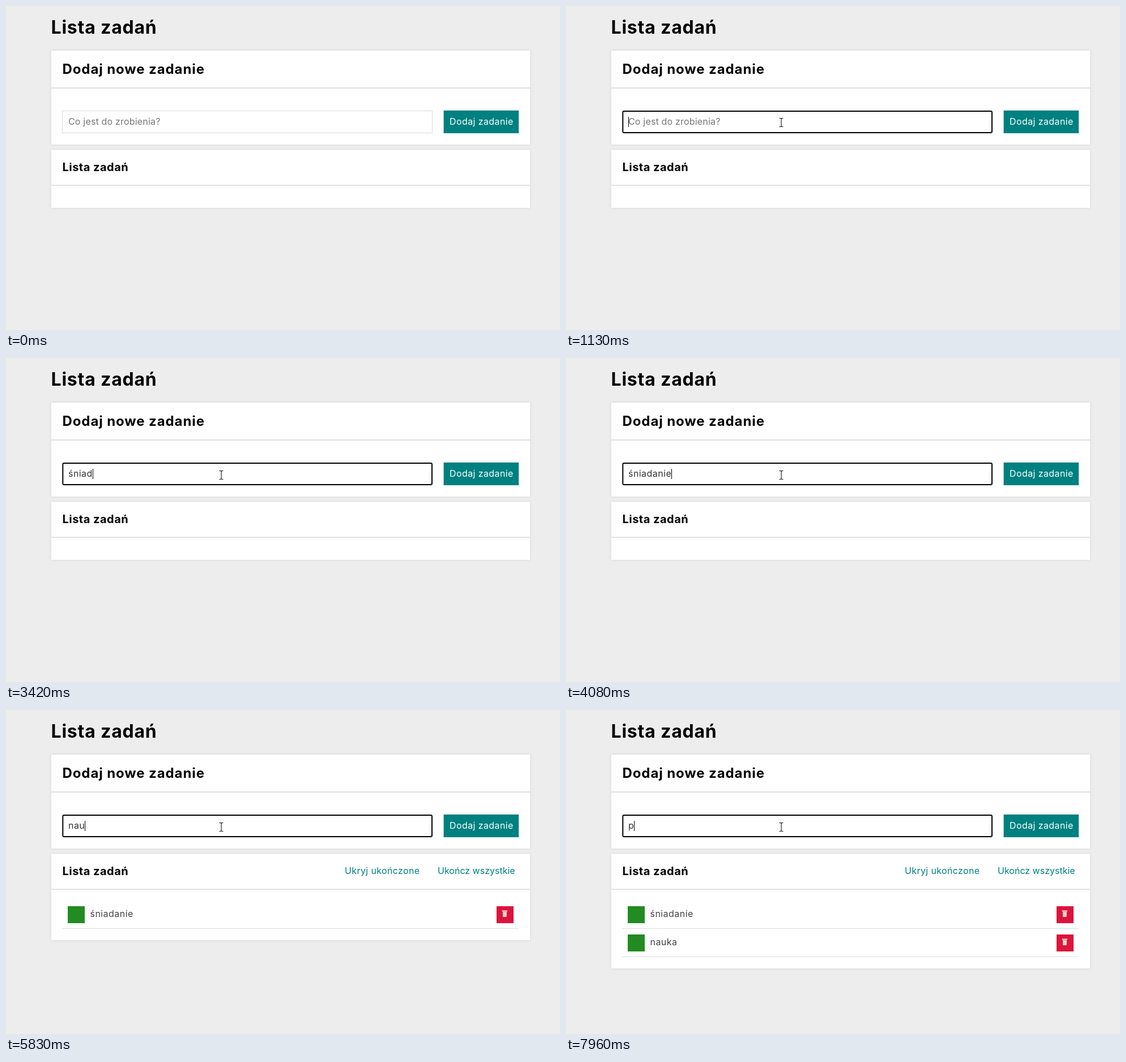
Recreate the animation shown at these times as an HTML page. Size 978x573 px, loop 8 s.

```html
<!DOCTYPE html>
<html lang="pl">
<head>
<meta charset="utf-8">
<title>Lista zadań</title>
<style>
html, body { margin: 0; width: 100%; height: 100%; overflow: hidden; background: #ededed; }
svg { display: block; width: 978px; height: 573px; font: 16px Inter, "Open Sans", sans-serif; letter-spacing: .35px; }
text { white-space: pre; }
.card { fill: #fff; filter: drop-shadow(0 0 2px #d4d4d4); }
.line { fill: #e3e3e3; }
.head { font-weight: 650; }
.link { fill: #008080; }
.item { fill: #444; letter-spacing: .45px; }
</style>
</head>
<body>
<svg viewBox="0 0 978 573">
  <defs>
    <g id="row">
      <rect x="109" y="347" width="30" height="30" fill="#228b22"/>
      <rect x="866" y="347" width="30" height="30" fill="#dc143c"/>
      <path d="M876 354.5h9v2h-9z" fill="#f6e9d8"/>
      <path d="M877 357h7l-.6 9h-5.8z" fill="#efc9b8"/>
      <path d="M877.5 357l.4 8.5h5.2l.4-8.5M879.5 358v7M881.5 358v7" fill="none" stroke="#fff1e2" stroke-width=".8"/>
      <rect x="99" y="386" width="806" height="1" fill="#ddd"/>
    </g>
  </defs>
  <rect width="978" height="573" fill="#ededed"/>
  <text class="head" x="79.5" y="49" font-size="32" letter-spacing=".8">Lista zadań</text>

  <rect class="card" x="80" y="79" width="845" height="166"/>
  <text class="head" x="99.5" y="120" font-size="24" letter-spacing=".9">Dodaj nowe zadanie</text>
  <rect class="line" x="80" y="144" width="845" height="2"/>
  <rect id="field" fill="#fff"/>
  <text id="value" x="110" y="209.5"></text>
  <rect id="caret" y="196" width="1" height="18"/>
  <rect x="772.6" y="184.8" width="132.6" height="40.2" fill="#008080"/>
  <text x="783" y="209.5" fill="#fff" letter-spacing=".4">Dodaj zadanie</text>

  <rect id="list" class="card" x="80" y="254.5" width="845"/>
  <text class="head" x="99.5" y="292" font-size="20" letter-spacing=".48">Lista zadań</text>
  <rect class="line" x="80" y="316" width="845" height="2"/>
  <g id="links" class="link">
    <text x="598" y="290">Ukryj ukończone</text>
    <text x="762" y="290" letter-spacing="0">Ukończ wszystkie</text>
  </g>
  <g class="task"><use href="#row"/><text class="item" x="148.5" y="365.5">śniadanie</text></g>
  <g class="task" transform="translate(0 50)"><use href="#row"/><text class="item" x="148.5" y="365.5">nauka</text></g>

  <circle id="click" cx="378" cy="205.5" r="11.5" fill="#ff0" fill-opacity=".47"/>
  <path id="arrow" d="M.5.5v16l3.7-3.5 2.5 5.5 2.4-1-2.4-5.4h5z" fill="#fff" stroke="#000"/>
  <path id="beam" d="M-3.5-7.5h2.5l1 1 1-1h2.5M0-6.5v13M-3.5 7.5h2.5l1-1 1 1h2.5" fill="none" stroke="#111" stroke-width="1.1"/>
</svg>
<script>
const LOOP = 8000;
const $ = id => document.getElementById(id);
const set = (el, attrs) => { for (const k in attrs) el.setAttribute(k, attrs[k]); };
const show = (el, on) => el.style.display = on ? '' : 'none';
const tasks = document.querySelectorAll('.task');

// [time, typed text, caret visible, tasks listed]
const steps = [
  [0, '', 0, 0], [1130, '', 1, 0], [1590, '', 0, 0],
  [2070, 'ś', 1, 0], [2670, 'ś', 0, 0], [2780, 'śn', 1, 0], [2890, 'śni', 1, 0],
  [3000, 'śnia', 1, 0], [3420, 'śniad', 1, 0], [3550, 'śniada', 1, 0],
  [3820, 'śniadan', 1, 0], [3880, 'śniadani', 1, 0], [4080, 'śniadanie', 1, 0],
  [4410, '', 1, 1], [4630, '', 0, 1], [5160, '', 1, 1],
  [5500, 'n', 1, 1], [5630, 'na', 1, 1], [5830, 'nau', 1, 1], [6030, 'nauk', 1, 1],
  [6360, 'nauka', 1, 1], [6880, 'nauka', 0, 1],
  [7080, '', 0, 2], [7360, '', 1, 2], [7910, '', 0, 2], [7960, 'p', 1, 2]
];

function drawField(t, text, caret) {
  const focus = t >= 1130, inset = focus ? 1 : .5, left = focus ? 99.3 : 99;
  set($('field'), {
    x: left + inset, y: 185 + inset, width: 753 - left - 2 * inset, height: 40 - 2 * inset,
    rx: focus ? 2 : 0, stroke: focus ? '#000' : '#d9d9d9', 'stroke-width': 2 * inset
  });
  const value = $('value');
  value.textContent = text || 'Co jest do zrobienia?';
  set(value, { fill: text ? '#333' : '#757575', 'letter-spacing': text ? .45 : .18 });
  show($('caret'), caret);
  set($('caret'), { x: 110 + (text ? Math.round(value.getComputedTextLength()) : 0) });
}

function drawList(count) {
  set($('list'), { height: 102.5 + 50 * count });
  show($('links'), count);
  tasks.forEach((el, i) => show(el, i < count));
}

// The pointer slides in, overshoots upwards and settles in the field.
function drawPointer(t) {
  const p = Math.min(1, Math.max(0, Math.floor((t - 70) / 79) / 10));
  const ease = 1 - (1 - p) ** 2.2;
  const settle = Math.max(0, (p - .7) / .3);
  const x = Math.round(799 - 419 * ease);
  const y = Math.round(512 - 306 * ease - 9 * Math.sin(Math.PI * settle)) + (t >= 1260 ? 1 : 0);
  const inField = x > 99 && x < 753 && y > 185 && y < 225;
  const at = { transform: `translate(${x} ${y})` };
  set($('arrow'), at);
  set($('beam'), at);
  show($('arrow'), t >= 70 && !inField);
  show($('beam'), t >= 70 && inField);
  show($('click'), t >= 990 && t < 1130);
}

function draw(t) {
  const [, text, caret, count] = steps.filter(s => s[0] <= t).pop();
  drawField(t, text, caret);
  drawList(count);
  drawPointer(t);
}

const start = performance.now();
function tick() {
  draw((performance.now() - start) % LOOP);
  requestAnimationFrame(tick);
}
tick();
</script>
</body>
</html>
```
